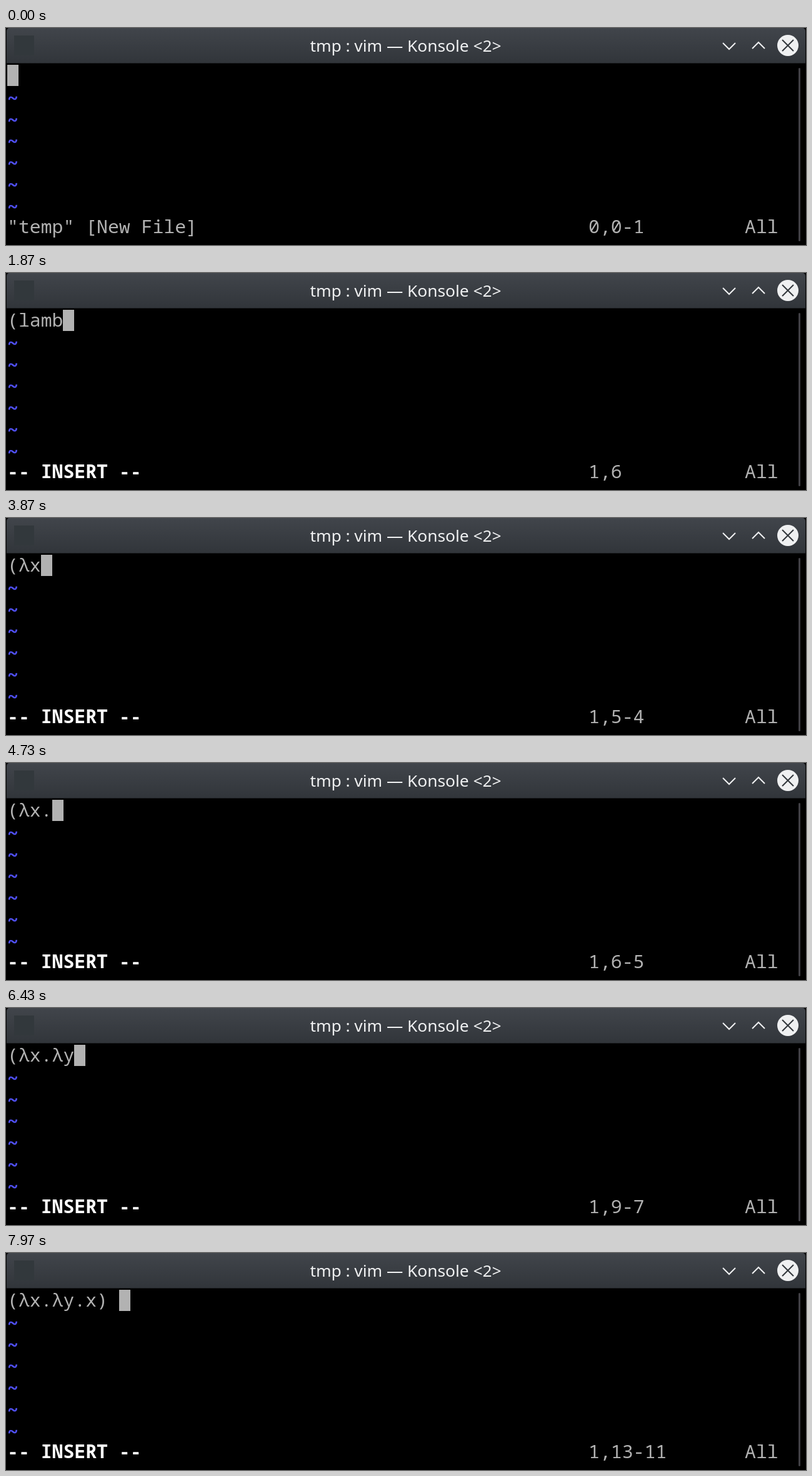
An HTML page for the animation above (8000 ms loop, 1280x348 px).

```html
<!DOCTYPE html>
<html lang="en">
<head>
<meta charset="utf-8">
<title>Terminal</title>
<style>
  html, body { margin: 0; width: 100%; height: 100%; overflow: hidden; background: #000; }
  svg { display: block; width: 1280px; height: 348px; }
  text { white-space: pre; }
  .term { font: 29.8px "Noto Sans Mono", "DejaVu Sans Mono", monospace; fill: #b2b2b2; }
  .term .bold { font-weight: 700; fill: #fff; }
  .tilde { fill: #5454ff; stroke: #5454ff; stroke-width: .7; }
  .title { font: 26.300px "Noto Sans", "Open Sans", sans-serif; fill: #eff0f1; text-anchor: middle; }
  .icon { fill: none; stroke: #eff0f1; stroke-width: 2; }
</style>
</head>
<body>
<svg viewBox="0 0 1280 348">
  <defs>
    <linearGradient id="bar" x2="0" y2="1">
      <stop offset="0" stop-color="#41454b"/>
      <stop offset="1" stop-color="#31353a"/>
    </linearGradient>
  </defs>
  <rect width="1280" height="348"/>
  <path d="M1 56.500V5Q1 0 6 0H1274Q1279 0 1279 5V56.500Z" fill="url(#bar)"/>
  <rect x="13" y="12" width="32" height="32" fill="#32383c"/>
  <text class="title" x="639.5" y="38">tmp : vim — Konsole &lt;2&gt;</text>
  <g class="icon">
    <path d="M1147 24l10 10 10-10M1194 33l10-10 10 10"/>
    <circle cx="1251" cy="28" r="17" fill="#eff0f1" stroke="none"/>
    <path d="M1242 19l18 18m0-18l-18 18" stroke="#31363b"/>
  </g>
  <rect x="1268" y="64" width="3" height="278" rx="1.500" fill="#403f44"/>
  <g class="term">
    <rect id="cursor" y="59" width="18" height="34"/>
    <text id="line" x="2" y="86"></text>
    <g id="tildes" class="tilde"></g>
    <text id="mode" x="2" y="329"></text>
    <text id="ruler" x="932" y="329"></text>
    <text x="1182" y="329">All</text>
  </g>
</svg>
<script>
  const LOOP = 8000, CELL = 17.88, ROW = 34.8;
  const $ = id => document.getElementById(id);

  // Each step holds from its time until the next one.
  const steps = [[0, null], [670, ""], [1170, "("]];
  const typeOut = (prefix, word, start, gap) => {
    for (let i = 1; i <= word.length; i++)
      steps.push([start + (i - 1) * gap, prefix + word.slice(0, i)]);
  };
  typeOut("(", "lambda", 1470, 120);
  steps.push([2900, "(λ"], [3770, "(λx"], [4270, "(λx."]);
  typeOut("(λx.", "lambda", 4790, 115);
  steps.push([5970, "(λx.λ"], [6370, "(λx.λy"], [6770, "(λx.λy."],
             [7130, "(λx.λy.x"], [7500, "(λx.λy.x)"], [7830, "(λx.λy.x) "]);

  for (let row = 1; row <= 6; row++) {
    const mark = document.createElementNS("http://www.w3.org/2000/svg", "text");
    mark.setAttribute("x", 2);
    mark.setAttribute("y", 88 + row * ROW);
    mark.textContent = "~";
    $("tildes").append(mark);
  }

  // Byte column, followed by the screen column where they differ.
  function position(text) {
    if (text === null) return "0,0-1";
    if (text === "") return "0,1";
    const bytes = new TextEncoder().encode(text).length + 1;
    const column = text.length + 1;
    return "1," + bytes + (bytes === column ? "" : "-" + column);
  }

  let shown;
  function draw(now) {
    const time = now % LOOP;
    const text = steps.filter(step => step[0] <= time).pop()[1];
    if (text !== shown) {
      shown = text;
      const inserting = text !== null;
      $("line").textContent = text || "";
      $("cursor").setAttribute("x", Math.round(2 + (text || "").length * CELL));
      $("mode").textContent = inserting ? "-- INSERT --" : '"temp" [New File]';
      $("mode").setAttribute("class", inserting ? "bold" : "");
      $("ruler").textContent = position(text);
    }
  }
  function tick(now) {
    draw(now);
    requestAnimationFrame(tick);
  }
  draw(0);
  requestAnimationFrame(tick);
</script>
</body>
</html>
```
